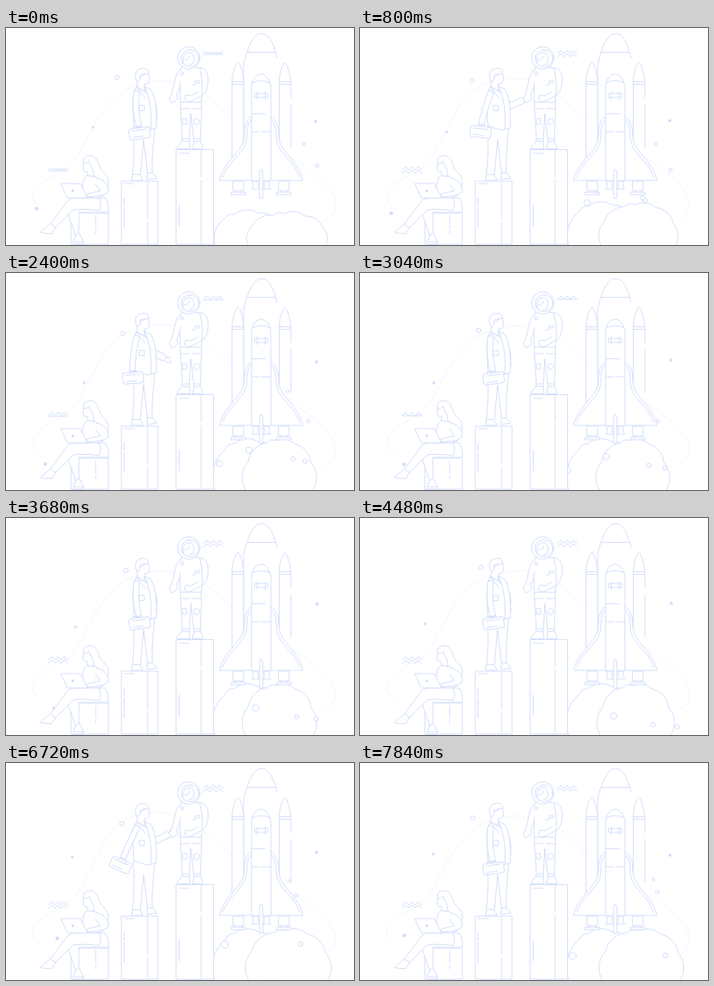
Write an HTML page that moves like this. It is 435 px wide and 272 px high and loops after 8000 ms.

```html
<!DOCTYPE html>
<html lang="en">
<head>
<meta charset="utf-8">
<title>Launch team</title>
<style>
html, body { margin: 0; width: 100%; height: 100%; overflow: hidden; background: #fff; }
svg { display: block; width: 100vw; height: 100vh; }
.line { fill: none; stroke: #d3defb; stroke-width: 1; stroke-linecap: round; stroke-linejoin: round; }
.solid { fill: #fff; }
.open { fill: none; }
.dot { fill: #d3defb; stroke: none; }
.faint { stroke: #f3f6fe; }
</style>
</head>
<body>
<svg viewBox="0 0 435 272" class="line">
  <path id="blob" class="faint"/>
  <g id="drift"></g>
  <path id="waveTop"/><path id="waveLow"/>

  <path id="smokeBack" class="solid"/>
  <path id="smokeFront" class="solid"/>
  <g id="puffs"></g>

  <g id="rocket" class="solid">
    <path d="M297 125V47C300 30 308 7 319 7S335 22 339 37"/>
    <path d="M302 30.500H337"/>
    <path d="M282.500 190V67C283 57 286 46 290 43C294 46 296 57 297 67V190"/>
    <path d="M282.500 67.500H297M282.500 70.500H297"/>
    <path d="M284 192H297V204H284ZM281.500 206H299.500V209H281.500ZM286 204V206M295 204V206"/>
    <path d="M341.500 190V67C342 57 345 46 348.500 43C352 46 355 57 356 67V87M356 96V150"/>
    <path d="M341.500 67.500H356M341.500 70.500H356"/>
    <path d="M341 192H354V204H341ZM338.500 206H356.500V209H338.500ZM343 204V206M352 204V206"/>
    <path d="M307 111C300 115 298 124 298 135C298 155 273 164 267 191H307Z"/>
    <path d="M331 111C338 115 341 124 341 135C341 155 365 164 371 191H331Z"/>
    <path class="open" d="M307 115C302 119 301 127 301 136C301 157 278 165 271 187M331 115C336 119 338 127 338 136C338 157 360 165 367 187"/>
    <path d="M307 191V72C308 64 313 58 319 58S329 64 331 72V191Z"/>
    <path class="open" d="M308 69C313 65 325 65 330 69M311 82H327V87H311ZM314 80V90M324 80V90M307 107.500H324M308 130H317M320 130H331"/>
    <path d="M309 192H315V199L317 202H307L309 199ZM323 192H329V199L331 202H321L323 199Z"/>
    <path d="M317 213V181Q319 173 321 181V213Z"/>
  </g>

  <g id="pillars" class="solid">
    <path d="M81.500 232H128V271H81.500ZM144.500 192H190V271H144.500ZM213 152.500H259.500V271H213Z"/>
    <path d="M112 235V251M112 254V258M147.500 213V222M147.500 225V250M177 193V240M177 244V271M148 195H160M244 153V187M244 191V271M217 157H229M216.500 222V248"/>
  </g>

  <g id="woman" class="solid">
    <path d="M98 171C94 163 100 160 106 160C113 161 115 168 117 174C120 181 128 184 128 193C128 200 124 204 118 204L108 184Z"/>
    <path d="M97 170C95 177 97 181 102 180V186Q106 188 110 185L109 178C107 174 105 172 104 167C102 169 100 170 97 170Z"/>
    <path d="M101 185C95 189 95 200 97 212L113 214L122 210L113 187Z"/>
    <path d="M113 213H124Q129 220 128 231H91L91 256L97 268H84L87 260L78 234Q77 227 86 227H110"/>
    <path d="M116 213H83Q77 215 73 222L56 245L44 255Q42 257 46 257L57 258L62 250L84 228Q98 226 116 229Q121 222 116 213Z"/>
    <path class="open" d="M56 246L62 250M87 260L92 257M83 271H97L96 267"/>
    <path d="M69 195H93L102 213H77Z"/>
    <circle class="dot" cx="83.500" cy="204" r="1.700"/>
    <path d="M114 188C125 190 130 201 127 206C122 211 110 211 103 212L100 209L105 207L118 204L112 196"/>
  </g>

  <g id="man" class="solid">
    <path id="reachEdge"/><path id="reachFill"/>
    <path id="hand"/>
    <path d="M159 124C161 148 160 166 158 184H168L172 140L177 183H183C182 165 184 146 186 124Z"/>
    <path d="M158 184L157 191H171Q171 188 167 184ZM177 182L176 190L189 188Q187 185 183 182Z"/>
    <path d="M164 64V74L173 79V70C180 71 180 64 178 56Z"/>
    <path d="M164 67C159 59 163 51 169 51C175 49 179 53 178 57C174 58 171 57 168 59L167 65Z"/>
    <path d="M163 74C157 80 159 105 160 123L177 128L188 125C188 106 188 88 181 77L173 73L176 81Z"/>
    <path class="open" d="M173 73C177 84 183 95 181 127M163 74L174 88M167 97H173V103.500H167Z"/>
    <path id="armEdge"/><path id="armFill"/>
    <g id="case">
      <path class="open" d="M-4 -7V-9H4V-7"/>
      <rect x="-13" y="-7" width="26" height="14" rx="3"/>
      <path class="open" d="M-9 -4H9M-9 4H4"/>
    </g>
  </g>

  <g id="astronaut" class="solid">
    <path d="M241 50C252 49 254 61 252 72C251 81 246 85 242 86Z"/>
    <path d="M218 92C218 112 221 128 220 143H229L231 107L235 143H243C243 126 245 110 244 91Z"/>
    <path d="M220 142L214 149V151.500H230L229 143ZM235 143L233 151.500H246V149L243 142Z"/>
    <path d="M219 50C215 60 218 77 218 93H244C246 79 246 62 242 50Z"/>
    <path d="M218 52C211 57 211 70 207 83L204 88L207 94L211 92L215 88L213 84C216 78 218 74 218 68"/>
    <path class="open" d="M244 85L233 91L227 93L223 89L225 84L231 85L240 80"/>
    <circle cx="228.500" cy="37.500" r="14"/>
    <ellipse cx="230" cy="38" rx="11" ry="10.500"/>
    <path class="open" d="M222 45C219 36 224 30 231 31C236 33 236 42 233 45L229 46M223 40C227 41 229 38 229 35"/>
    <circle cx="220" cy="57" r="2"/>
    <path class="open" d="M232 71H237M237 66H242V69H237ZM218 101H229M233 101H244M220 114L225 113L226 120L222 121ZM235 115Q241 111 242 117Q240 123 236 121ZM221 139H229M235 139H243"/>
  </g>
</svg>

<script>
const STEP = 160, LOOP = 8000, SHAKE = 4960, TAU = Math.PI * 2;
const $ = id => document.getElementById(id);
const set = (id, d) => $(id).setAttribute('d', d);
const lerp = (a, b, k) => a + (b - a) * k;
function ease(t, from, to) {
  const k = Math.max(0, Math.min(1, (t - from) / (to - from)));
  return k * k * (3 - 2 * k);
}

function circle(parent, r, cls) {
  const c = document.createElementNS('http://www.w3.org/2000/svg', 'circle');
  c.setAttribute('r', r);
  c.setAttribute('class', cls);
  return $(parent).appendChild(c);
}
function place(c, x, y) {
  c.setAttribute('cx', x);
  c.setAttribute('cy', y);
}

// Floating marks either circle a centre or sway back and forth.
function orbit(cx, cy, dir) {
  return t => {
    const a = TAU * t / 10550 - .12;
    return [cx + dir * 15 * Math.cos(a), cy + 12 * Math.sin(a)];
  };
}
function sway(cx, cy, dx, dy, rate = 1) {
  return t => {
    const a = TAU * t / 8960;
    return [cx + dx * Math.cos(a), cy + dy * Math.cos(rate * a)];
  };
}
const drift = [
  { move: orbit(94, 126, 1), el: circle('drift', 1.8, 'dot') },
  { move: orbit(53, 228, -1), el: circle('drift', 2.3, 'dot') },
  { move: orbit(374, 174, 1), el: circle('drift', 2.2, 'solid') },
  { move: sway(145, 69, -6, -7, 2), el: circle('drift', 2.7, 'solid') },
  { move: sway(388, 112, -1, 5), el: circle('drift', 2, 'dot') },
  { move: sway(354, 148, 18, -3), el: circle('drift', 1.7, 'solid') }
];

// Rings thrown out by the engines.
const puffs = [
  { start: 0, x: 292, speed: -10.5, r: 3.7 },
  { start: 240, x: 350, speed: 11, r: 2.7 },
  { start: 480, x: 352, speed: 3.5, r: 2.7 },
  { start: 1360, x: 297, speed: 6.5, r: 4 },
  { start: 5230, x: 284, speed: -7, r: 4.5 },
  { start: 5280, x: 350, speed: 12.5, r: 3 }
];
for (const p of puffs) p.el = circle('puffs', p.r, 'solid');

// A dome outlined by unequal bumps.
function cloud(cx, half, height, count, seed) {
  let d = '', px, py;
  for (let i = 0; i <= count; i++) {
    const uneven = i % count ? .3 * Math.sin(i * seed) : 0;
    const a = Math.PI * (i + uneven) / count;
    const x = cx - half * Math.cos(a), y = 272 - height * Math.abs(Math.sin(a)) ** .6;
    const r = Math.hypot(x - px, y - py) * .85;
    d += i ? `A${r} ${r} 0 0 1 ${x} ${y}` : `M${x} 276V${y}`;
    px = x;
    py = y;
  }
  return d + 'V276Z';
}

function moveSmoke(t) {
  const rise = ease(t, 0, 1600);
  const w = Math.cos(TAU * (t - 3000) / LOOP);
  set('smokeBack', cloud(304, 43, lerp(41, 62, rise), 5, 2));
  set('smokeFront', cloud(347 - 6 * w, 46 - 4 * w, lerp(39, 62, rise), 6, 4));
  for (const { el, start, x, speed } of puffs) {
    const age = (t - start) / 1000, y = 209 + 12.5 * age;
    el.style.display = age > 0 && y < 277 ? '' : 'none';
    place(el, x + speed * age, y);
  }
}

function wave(x, y, amp) {
  let d = `M${x} ${y + amp}`;
  for (let i = 1; i < 7; i++) {
    const side = i % 2 ? -amp : amp;
    d += `C${x + i * 4 - 2.500} ${y - side} ${x + i * 4 - 1.500} ${y + side} ${x + i * 4} ${y + side}`;
  }
  return d;
}
// The two lines cross when apart is 0 and run in parallel when it is 1.
const waves = (x, y, apart) =>
  wave(x, y - 2.2 * apart, 1.8) + wave(x, y + 2.2 * apart, lerp(-1.8, 1.8, apart));

// A limb is a thick line with a thinner white line on top.
function limb(name, d, w) {
  for (const [part, color, width] of [['Edge', '#d3defb', w + 1], ['Fill', '#fff', w - 1]]) {
    const el = $(name + part);
    el.setAttribute('d', d);
    el.setAttribute('fill', 'none');
    el.style.stroke = color;
    el.style.strokeWidth = width;
  }
}

function moveMan(reach, swing) {
  const a = lerp(85, -27, reach) * Math.PI / 180, len = lerp(13, 24, reach);
  const c = Math.cos(a), s = Math.sin(a), x = 184 + len * c, y = 99 + len * s;
  limb('reach', `M180 84Q182 96 184 99L${x - 4 * c} ${y - 4 * s}`, 8);
  const pt = (u, v) => `${x + u * c - v * s} ${y + u * s + v * c}`;
  set('hand', `M${pt(-1, -2)}L${pt(3, -4)}L${pt(5, -2)}L${pt(7, 1)}L${pt(4, 3)}L${pt(-1, 2)}Z`);

  const cx = lerp(167, 143, swing), cy = 132 - 4 * swing * swing;
  const turn = -8 + 32 * swing * swing, r = turn * Math.PI / 180;
  const hx = cx + 10 * Math.sin(r), hy = cy - 12 * Math.cos(r);
  limb('arm', `M163 82Q${lerp(161, 152, swing)} 105 ${hx} ${hy}`, 7);
  $('case').setAttribute('transform', `translate(${cx} ${cy}) rotate(${turn})`);
}

function draw(t) {
  const p = t % SHAKE;
  const reach = ease(p, 0, 900) - ease(p, 2000, 2800);
  const swing = ease(p, 0, 1300) - ease(p, 1700, 2850);

  set('blob', `M45 228C20 210 40 195 70 180C95 165 100 ${lerp(130, 142, swing)} 125 ${lerp(100, 96, swing)}`
    + `C150 ${lerp(65, 54, swing)} 195 ${lerp(62, 58, swing)} 225 70`
    + `C260 ${lerp(82, 92, swing)} 280 120 320 140C350 160 410 190 412 220Q412 235 397 242`);
  for (const { el, move } of drift) place(el, ...move(t));

  const apart = 1 - (1 - Math.abs(Math.sin(Math.PI * t / 2800))) ** 2;
  set('waveTop', waves(247, 32, apart));
  set('waveLow', waves(53, 178, apart));

  moveSmoke(t);
  moveMan(reach, swing);
}

const start = performance.now();
function tick() {
  const t = (performance.now() - start) % LOOP;
  draw(Math.floor(t / STEP) * STEP);
  requestAnimationFrame(tick);
}
tick();
</script>
</body>
</html>
```
